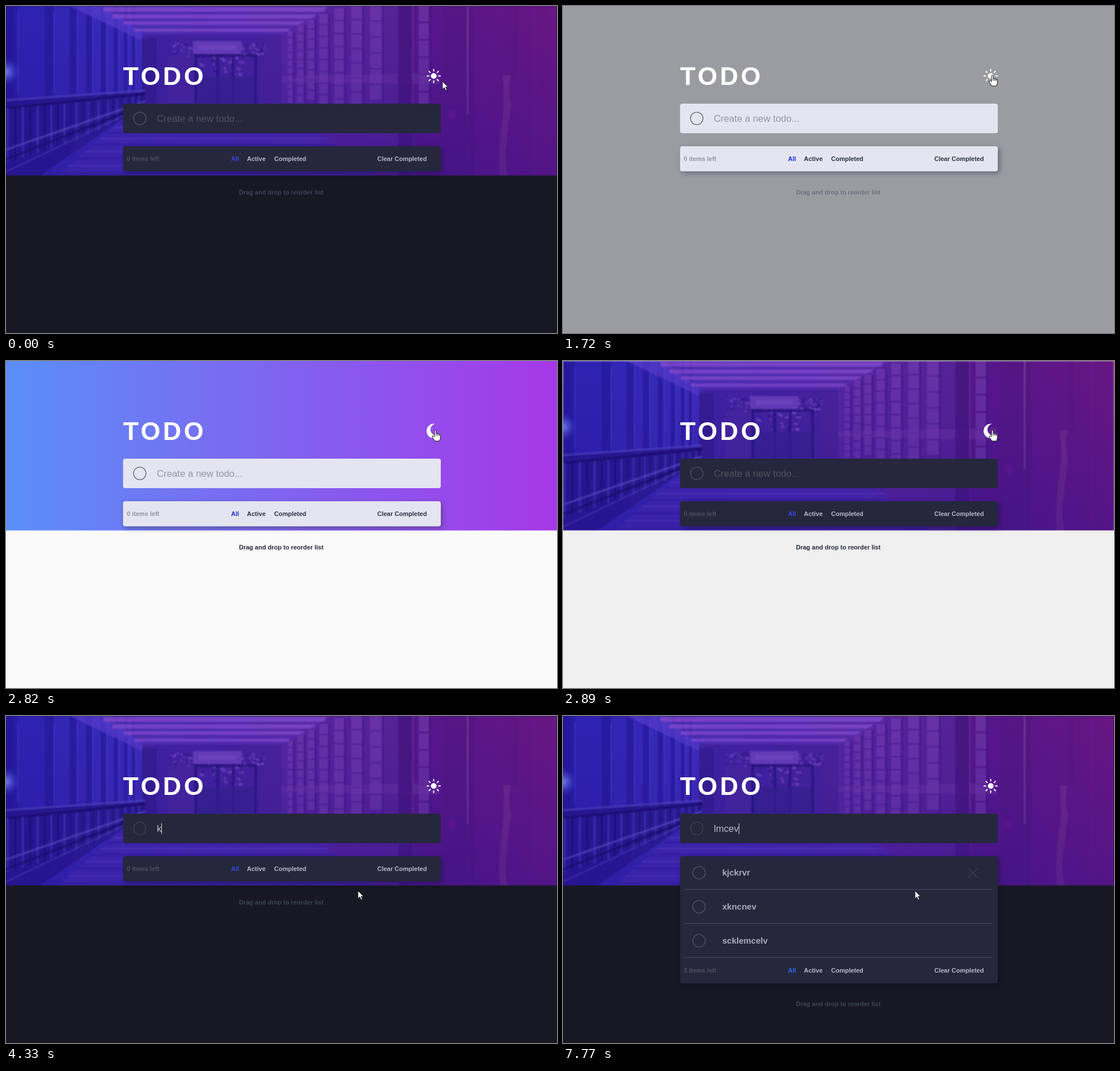
Write an HTML page that moves like this. It is 972 px wide and 576 px high and loops after 8 s.

```html
<!DOCTYPE html>
<html lang="en">
<head>
<meta charset="utf-8">
<title>Todo list</title>
<style>
  html, body { margin: 0; width: 100%; height: 100%; overflow: hidden; background: #171823; }
  svg {
    display: block; width: 972px; height: 576px;
    font-family: "Liberation Sans", Arial, sans-serif;
    --card: #25273c; --ring: #55586e; --hint: #50535f; --muted: #4c505f;
    --link: #b6b9ca; --active: #3549e0; --note: #41435a; --shade: rgba(10, 8, 30, .35);
  }
  svg.light {
    --card: #e4e5f0; --ring: #4b4e60; --hint: #9296a5; --muted: #9095a3;
    --link: #2b3142; --active: #1b2fce; --shade: rgba(60, 62, 95, .6);
  }
  svg.focused { --ring: #454855; --note: #3d4552; }
  svg.filled { --active: #2f69ee; --ring: #555870; }
  .card { fill: var(--card); }
  .ring { fill: none; stroke: var(--ring); stroke-width: 1.1; }
  #inputRing { stroke: var(--ring); }
  svg.filled #inputRing { stroke: #454855; }
  #list { filter: drop-shadow(3px 3px 4px var(--shade)); }
  .title { font-size: 44.8px; font-weight: 700; letter-spacing: .1em; fill: #fff; }
  .field { font-size: 16.8px; fill: #b9bccb; }
  .hint { fill: var(--hint); }
  .item { font-size: 15px; font-weight: 700; fill: #a9acbb; }
  .small { font-size: 11px; font-weight: 700; fill: var(--link); }
  .muted { fill: var(--muted); }
  .active { fill: var(--active); }
  .divider { stroke: #4d5065; }
  .cross { stroke: #4d5066; fill: none; }
  .hidden { display: none; }
</style>
</head>
<body>
<svg id="stage" viewBox="0 0 972 576" xmlns="http://www.w3.org/2000/svg">
  <defs>
    <linearGradient id="night">
      <stop offset="0" stop-color="#2b20b0"/><stop offset=".22" stop-color="#3a2cba"/>
      <stop offset=".42" stop-color="#4c28b0"/><stop offset=".6" stop-color="#5a269f"/>
      <stop offset=".75" stop-color="#56198a"/><stop offset="1" stop-color="#681683"/>
    </linearGradient>
    <linearGradient id="day">
      <stop offset="0" stop-color="#5a8ff8"/><stop offset="1" stop-color="#a638e8"/>
    </linearGradient>
    <linearGradient id="dusk" x2="0" y2="1">
      <stop offset="0" stop-color="#2a128c" stop-opacity="0"/>
      <stop offset="1" stop-color="#2a128c" stop-opacity=".35"/>
    </linearGradient>
    <radialGradient id="lamp">
      <stop offset="0" stop-color="#8090ff"/><stop offset="1" stop-color="#4048e0" stop-opacity="0"/>
    </radialGradient>
    <clipPath id="header"><rect width="972" height="298.5"/></clipPath>
    <filter id="soft"><feGaussianBlur stdDeviation=".8"/></filter>
  </defs>

  <rect id="page" width="972" height="576"/>
  <g id="photo" clip-path="url(#header)"></g>
  <rect id="sky" width="972" height="298.5" fill="url(#day)"/>

  <text class="title" x="206.5" y="139">TODO</text>
  <g id="sun" transform="translate(754.5 123.3)" fill="#fff"><circle r="5"/></g>
  <path id="moon" transform="translate(742 110.5) scale(.98)" fill="#fff"
    d="M13 0q1.2 0 2.4.2A10.5 10.5 0 1 0 25.1 17.7 13 13 0 1 1 13 0z"/>

  <rect class="card" x="206.5" y="172" width="560.5" height="52" rx="4"/>
  <circle id="inputRing" class="ring" cx="236" cy="198" r="11"/>
  <text id="hint" class="field hint" x="266" y="203.7">Create a new todo...</text>
  <text id="typed" class="field" x="266" y="203.7"></text>
  <rect id="caret" y="189" width="1" height="19" fill="#d8dae6"/>

  <rect id="list" class="card" x="206.5" y="247" width="560.5" height="44.3" rx="4"/>
  <g id="items"></g>
  <g id="footer">
    <text id="count" class="small muted" x="213" y="272.5"></text>
    <text class="small active" x="397" y="272.5">All</text>
    <text class="small" x="425" y="272.5">Active</text>
    <text class="small" x="473" y="272.5">Completed</text>
    <text class="small" x="655" y="272.5">Clear Completed</text>
    <text id="note" class="small" x="411" y="332.3">Drag and drop to reorder list</text>
  </g>

  <g id="pointer" stroke="#111" fill="#fff" stroke-linejoin="round">
    <path id="arrow" stroke-width=".8" d="M0 0V13.5L3.2 10.6 5.5 15.8 7.7 14.8 5.4 9.8H9.6z"/>
    <path id="hand" d="M-1.5 12V1.5Q0 -.8 1.5 1.5V6.5Q3 4.8 4.2 7 5.8 5.6 6.8 7.7 8.8 6.8 9 9.2V13.5L7.3 19.5H-.8L-5.6 12.5Q-6.2 9.6-3.8 10.3zM1.5 6.5V10M4.2 7V10.3M6.8 7.7V10.8"/>
    <path id="beam" fill="none" stroke="#fff" d="M-3.5-8H-1L0-7 1-8H3.5M0-7V7M-3.5 8H-1L0 7 1 8H3.5"/>
  </g>
</svg>

<script>
const $ = id => document.getElementById(id);
const LOOP = 8000, ROW = 59.8;

const rect = (x, y, w, h, fill, opacity = 1) =>
  `<rect x="${x}" y="${y}" width="${w}" height="${h}" fill="${fill}" opacity="${opacity}"/>`;
const poly = (points, fill, opacity = 1) =>
  `<polygon points="${points}" fill="${fill}" opacity="${opacity}"/>`;
const line = (x1, y1, x2, y2, stroke, width = 1, opacity = 1) =>
  `<path d="M${x1} ${y1}L${x2} ${y2}" stroke="${stroke}" stroke-width="${width}" opacity="${opacity}"/>`;

let seed = 7;
const random = () => (seed = seed * 16807 % 2147483647) / 2147483647;

function corridor() {
  let art = rect(0, 0, 972, 299, 'url(#night)');

  // left colonnade and its lit cornice
  [[0, 20], [68, 16], [112, 13], [141, 11], [167, 10], [190, 8], [208, 7], [222, 6]].forEach(([x, w], i) => {
    art += rect(x, 0, w, 172 - i * 3, '#211591', .55) + rect(x + w, 12, 2, 140, '#4a4de0', .4);
  });
  art += poly('112,0 180,0 250,55 250,66', '#5e3fd0', .6);

  // ceiling strips
  art += poly('165,0 575,0 490,52 250,52', '#5930b0', .55);
  [[172, 2, 392, 8], [188, 15, 358, 7], [208, 27, 318, 6], [226, 40, 274, 5]].forEach(([x, y, w, h]) => {
    art += rect(x, y, w, h, '#8a4fd2', .65);
  });

  // far wall with sign, foliage and doors
  art += rect(240, 50, 246, 122, '#42209a', .75) + rect(240, 56, 26, 116, '#2c1784', .5);
  for (let i = 0; i < 130; i++) {
    const x = 288 + random() * 168, y = 65 + random() * (x < 332 || x > 415 ? 22 : 60);
    art += rect(x, y, 2 + random() * 5, 1 + random() * 4, i % 3 ? '#8454ca' : '#2c1478', .55);
  }
  art += rect(330, 62, 85, 22, '#6c40bd', .9) + rect(340, 69, 66, 8, '#7d51c8', .5);
  [332, 371, 398, 438].forEach(x => art += rect(x, 85, 5, 87, '#27127c', .8));
  art += rect(332, 85, 110, 5, '#27127c', .8) + rect(337, 125, 101, 47, '#37208f', .8);
  art += rect(286, 88, 46, 84, '#4c2aa0', .6) + rect(456, 56, 30, 116, '#4a2096', .7);

  // right wall: receding piers in stacked blocks
  art += poly('486,50 575,0 700,0 700,299 620,299 486,172', '#55239c', .6);
  [[497, 9], [514, 11], [532, 12], [553, 15], [579, 17], [609, 19], [642, 21], [728, 18]].forEach(([x, w], i) => {
    const step = 13 + i * 2.5, top = Math.max(0, 44 - i * 10);
    for (let y = top; y < 168; y += step) {
      art += rect(x, y, w, step - 3, '#7c43b5', .48);
    }
    art += rect(x + w, top, 4, 172 - top, '#3f1580', .45);
  });
  art += poly('486,124 765,118 765,138 486,134', '#7a3ead', .35);
  art += rect(692, 0, 25, 299, '#46117b', .75) + rect(716, 0, 3, 172, '#7b399e', .4);
  art += rect(771, 0, 42, 299, '#50147e', .45) + rect(813, 0, 3, 190, '#81429c', .6) + rect(816, 0, 9, 299, '#4c117a', .5);
  art += `<path d="M876 122h15q-7 25 0 52-5 38-8 68-6 30 3 57h-15q-3-50 4-95 6-38 1-82z" fill="#7d338f" opacity=".55"/>`;
  art += rect(890, 0, 12, 125, '#511379', .3) + rect(932, 0, 4, 299, '#7a2288', .25);
  art += `<circle cx="786" cy="191" r="8" fill="#8a2099" opacity=".3"/>`;

  // deck
  art += poly('240,172 490,172 650,299 90,299', '#4a2cb8', .55);
  for (let y = 177, i = 0; y < 299; y += 6 + i++ * .7) {
    art += line(240 - (y - 172) * 1.2, y, 490 + (y - 172) * 1.25, y, i % 2 ? '#6b48ce' : '#2b1589', 2, .55);
  }

  // railing
  art += poly('0,164 245,150 245,172 60,299 0,299', '#241382', .65);
  art += line(0, 166, 245, 149, '#5a55d8', 3, .65) + line(0, 180, 245, 155, '#170d62', 5, .7);
  for (let i = 0; i < 26; i++) {
    const x = 240 - i * (5 + i * .18);
    art += line(x, 157 + i * .9, x, 175 + i * 4, i % 2 ? '#4740c2' : '#180d64', 2 + i * .08, .6);
  }
  art += line(0, 253, 245, 168, '#6b65dc', 3, .6) + line(0, 270, 245, 174, '#160c60', 5, .65);
  art += line(0, 292, 215, 190, '#5d54cc', 2, .55);

  art += `<circle cy="116" r="24" fill="url(#lamp)"/>`;
  return `<g filter="url(#soft)">${art}</g>` + rect(0, 0, 972, 299, 'url(#dusk)');
}

$('photo').innerHTML = corridor();

for (let a = 0; a < 360; a += 45) {
  $('sun').innerHTML += `<path d="M0-8.7V-11.6" transform="rotate(${a})" stroke="#fff" stroke-width="2" stroke-linecap="round"/>`;
}

const todos = [[5070, 'kjckrvr'], [6050, 'xkncnev'], [7100, 'scklemcelv']];
$('items').innerHTML = todos.map(([, name], i) => `<g transform="translate(0 ${i * ROW})">
  <circle class="ring" cx="240" cy="276.2" r="11"/>
  <text class="item" x="281" y="281">${name}</text>
  ${i ? '' : '<path class="cross" d="M714.5 268.3l16.5 16.5m0-16.5l-16.5 16.5"/>'}
  <path class="divider" d="M213.5 305.7H757"/></g>`).join('');

// Each track lists [start, ...values]; the last started entry holds.
const typing = [
  [0, ''], [4330, 'k'], [4410, 'kj'], [4500, 'kjc'], [4600, 'kjck'], [4690, 'kjckr'], [4790, 'kjckrvr'],
  [5070, ''], [5250, 'x'], [5320, 'xk'], [5470, 'xkn'], [5570, 'xknc'], [5670, 'xkncne'], [5870, 'xkncnev'],
  [6050, ''], [6240, 's'], [6380, 'sckl'], [6520, 'sckle'], [6610, 'scklemc'], [6700, 'scklemcel'], [6840, 'scklemcelv'],
  [7100, ''], [7500, 'l'], [7570, 'lm'], [7640, 'lmc'], [7700, 'lmce'], [7770, 'lmcev']
];
const pointer = [
  [0, 'arrow', 770, 133], [1000, 'arrow', 767, 130], [1070, 'hand', 762, 126], [1140, 'hand', 759, 123], [1210, 'hand', 757.5, 121.5],
  [3370, 'arrow', 690, 150], [3440, 'beam', 560, 200], [3510, 'beam', 489, 219],
  [3780, 'arrow', 515, 238], [3850, 'arrow', 570, 276], [3930, 'arrow', 608, 300], [4000, 'arrow', 621, 308]
];
// page colour, header, icon, light cards, note colour
const theme = [
  [0, '#171823', 'night', 'sun', false, 'var(--note)'],
  [1720, '#9b9ca1', 'none', 'sun', true, '#6b7180'],
  [1780, '#f8f8f8', 'none', 'moon', true, '#8a949f'],
  [1840, '#fafafa', 'none', 'moon', true, '#58616f'],
  [1900, '#fafafa', 'day', 'moon', true, '#232a3b'],
  [2890, '#f0f0f0', 'night', 'moon', false, '#232a3b'],
  [2970, '#77777d', 'night', 'sun', false, '#323848'],
  [3050, '#171823', 'night', 'sun', false, 'var(--note)']
];
const at = (track, t) => track.findLast(entry => entry[0] <= t).slice(1);
const show = (el, on) => el.classList.toggle('hidden', !on);

function draw(t) {
  const [page, header, icon, light, note] = at(theme, t);
  const [text] = at(typing, t);
  const [shape, x, y] = at(pointer, t);
  const count = todos.filter(([start]) => start <= t).length;
  const stage = $('stage').classList;

  stage.toggle('light', light);
  stage.toggle('focused', t >= 3710);
  stage.toggle('filled', count > 0);
  $('page').style.fill = page;
  $('note').style.fill = note;
  show($('photo'), header === 'night');
  show($('sky'), header === 'day');
  ['sun', 'moon'].forEach(id => show($(id), id === icon));

  $('typed').textContent = text;
  show($('hint'), !text);
  show($('caret'), t >= 3710 && !(t >= 7300 && t < 7500));
  $('caret').setAttribute('x', 266 + Math.round(text ? $('typed').getComputedTextLength() : 0));

  [...$('items').children].forEach((row, i) => show(row, i < count));
  $('list').setAttribute('height', 44.3 + count * ROW);
  $('footer').setAttribute('transform', `translate(0 ${Math.round(count * ROW)})`);
  $('count').textContent = `${count} items left`;

  $('pointer').setAttribute('transform', `translate(${x} ${y})`);
  ['arrow', 'hand', 'beam'].forEach(id => show($(id), id === shape));
}

function tick() {
  draw(performance.now() % LOOP);
  requestAnimationFrame(tick);
}
tick();
</script>
</body>
</html>
```
